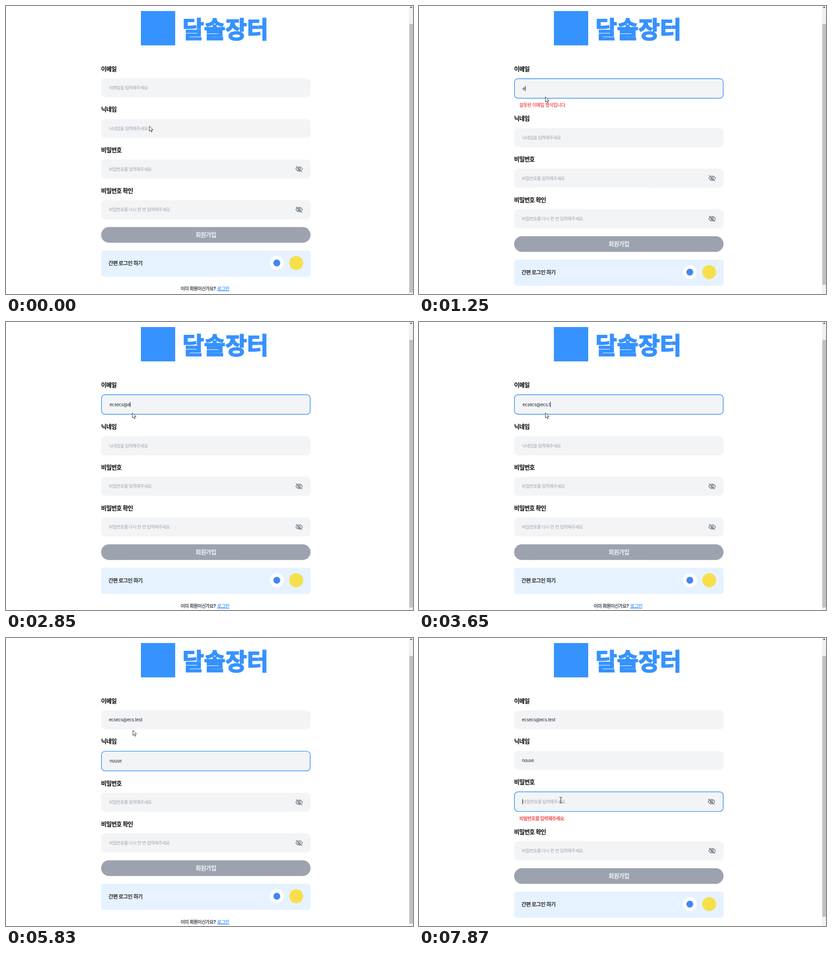
These frames come from a looping animation (890x629 px, 8000 ms). An HTML page:

```html
<!DOCTYPE html>
<html lang="ko">
<head>
<meta charset="utf-8">
<style>
  html, body { margin: 0; width: 100%; height: 100%; overflow: hidden; background: #fff; }
  svg { display: block; width: 890px; height: 629px; }
  text { font-family: Inter, 'Noto Sans CJK KR', 'Noto Sans CJK JP', sans-serif; letter-spacing: -.05em; }
  .value { letter-spacing: -.025em; }
  .wordmark { letter-spacing: 0; stroke: #3692ff; stroke-width: 2; }
  .medium { stroke: currentColor; stroke-width: .25; }
</style>
</head>
<body>
<svg id="stage" viewBox="0 0 890 629"></svg>
<script>
const LOOP = 8000, KEY_INTERVAL = 70, BLINK = 530;
const LEFT = 208, WIDTH = 458, PITCH = 88.67, BORDER = 1.43, ERROR_HEIGHT = 17.14;
const BLUE = '#3692ff', RED = '#f74747', GRAY = '#9ca3af', INK = '#1f2937';
const stage = document.getElementById('stage');

const fields = [
  { label: '이메일', hint: '이메일을 입력해주세요', error: '잘못된 이메일 형식입니다', weight: 500, focusAt: [800],
    bursts: { 1250: 'ecs', 1720: 'ecs', 2450: '@', 2850: 'ecs', 3250: '.', 3650: 'test' },
    invalid: value => value && !/^\w+@\w+(\.\w+)?$/.test(value) },
  { label: '닉네임', hint: '닉네임을 입력해주세요', focusAt: [4040], bursts: { 4510: 'nou', 5230: 'se' } },
  { label: '비밀번호', hint: '비밀번호를 입력해주세요', error: '비밀번호를 입력해주세요.', weight: 700,
    focusAt: [6320, 7870], secret: true, invalid: (value, t) => t >= 7060 },
  { label: '비밀번호 확인', hint: '비밀번호를 다시 한 번 입력해주세요', focusAt: [7060], secret: true }
];

const pointerStart = { x: 313, y: 262 };
const moves = [
  { at: 70, lasts: 320, x: 254.5, y: 180 },
  { at: 800, lasts: 330, x: 276, y: 198 },
  { at: 5800, lasts: 370, x: 333, y: 360 },
  { at: 6560, lasts: 360, x: 317, y: 446 },
  { at: 7130, lasts: 670, x: 310, y: 354 }
];

function pointerAt(t) {
  return moves.reduce((from, to) => {
    const p = Math.min(1, Math.max(0, (t - to.at) / to.lasts)), e = p * p * (3 - 2 * p);
    return { x: from.x + (to.x - from.x) * e, y: from.y + (to.y - from.y) * e };
  }, pointerStart);
}

// Text typed by time t, and when its last key was pressed
function typedAt(bursts = {}, t) {
  let value = '', keyTime = 0;
  for (const [start, word] of Object.entries(bursts)) {
    if (t < start) break;
    const count = Math.min(word.length, Math.floor((t - start) / KEY_INTERVAL) + 1);
    value += word.slice(0, count);
    keyTime = +start + (count - 1) * KEY_INTERVAL;
  }
  return { value, keyTime };
}

const lastFocus = (field, t) => Math.max(0, ...field.focusAt.filter(time => time <= t));

const rect = (x, y, w, h, r, fill, more = '') =>
  `<rect x="${x}" y="${y}" width="${w}" height="${h}" rx="${r}" fill="${fill}" ${more}/>`;
const circle = (x, y, r, fill) => `<circle cx="${x}" cy="${y}" r="${r}" fill="${fill}"/>`;
// Text whose glyphs are vertically centred on y
const text = (x, y, size, weight, fill, content, more = '') =>
  `<text x="${x}" y="${y + size * .37}" font-size="${size}" font-weight="${weight}" fill="${fill}" ${more}>${content}</text>`;
const mediumText = (x, y, size, fill, content, more = '') =>
  text(x, y, size, 500, fill, content, `class="medium" color="${fill}" ${more}`);

const eyeOff = (x, y) => `<g transform="translate(${x} ${y})" fill="none" stroke="#4b5563" stroke-width="1.15">
  <path d="M-7.2 0C-4.2-6.4 4.2-6.4 7.2 0C4.2 6.4-4.2 6.4-7.2 0Z"/><circle r="2.6"/>
  <path d="M-5.4-6.6L6.9 5.6" stroke="#f3f4f6"/><path d="M-6.5-6.2L6.2 6.3"/></g>`;

const arrow = ({ x, y }) => `<path transform="translate(${x} ${y})" d="M.4.3V11.6L3 9.2L4.9 13.4L6.7 12.6L4.9 8.5H8.4Z"
  fill="#fff" stroke="#222" stroke-width=".9"/>`;
const iBeam = ({ x, y }) => `<path transform="translate(${x} ${y})" fill="none" stroke="#222"
  d="M-3-6H-1Q0-6 0-5Q0-6 1-6H3M0-5V5M-3 6H-1Q0 6 0 5Q0 6 1 6H3"/>`;

const header = rect(295, 11, 75, 75, 0, BLUE) +
  text(386, 51.5, 51, 900, BLUE, '달솔장터', 'class="wordmark"');

function footer(shift) {
  return rect(LEFT, 482.7 + shift, WIDTH, 34.3, 17.15, GRAY) +
    text(LEFT + WIDTH / 2, 499.7 + shift, 12.86, 700, '#f3f4f6', '회원가입', 'text-anchor="middle"') +
    rect(LEFT, 534 + shift, WIDTH, 57, 5.7, '#e6f2ff') +
    mediumText(224, 562 + shift, 11.43, '#000', '간편 로그인 하기') +
    circle(592.2, 561.2 + shift, 15.2, '#fff') + circle(592.2, 561.2 + shift, 7.5, '#4285f4') +
    circle(634.6, 561.2 + shift, 15.2, '#f7df4b') +
    mediumText(382, 617 + shift, 10, INK, '이미 회원이신가요?') +
    mediumText(462, 617 + shift, 10, BLUE, '로그인', 'text-decoration="underline"');
}

const scrollbar = shift => rect(881, 0, 9, 629, 0, '#f1f1f1') +
  rect(882, 39, 8, 587 - shift * .85, 0, '#c1c1c1') +
  '<path d="M883 4L886 1L889 4Z" fill="#505050"/>';

function render(t) {
  const focusTime = Math.max(...fields.map(field => lastFocus(field, t)));
  const pointer = pointerAt(t);
  let out = header, shift = 0, caret = null, overText = false;

  fields.forEach((field, i) => {
    const active = focusTime > 0 && lastFocus(field, t) === focusTime;
    const pad = active ? BORDER : 0, textX = LEFT + 17 + pad;
    const top = 158 + i * PITCH + shift, height = 41.4 + pad * 2, middle = top + height / 2;
    const { value, keyTime } = typedAt(field.bursts, t);

    out += text(LEFT, top - 21, 12.86, 700, '#000', field.label);
    out += rect(LEFT, top, WIDTH, height, 8.57, '#f3f4f6');
    if (active) {
      out += rect(LEFT + pad / 2, top + pad / 2, WIDTH - pad, height - pad, 7.9, 'none',
        `stroke="${BLUE}" stroke-width="${BORDER}"`);
      const idle = t - Math.max(focusTime, keyTime);
      if (Math.floor(idle / BLINK) % 2 === 0) caret = { x: textX, y: middle, afterText: value !== '' };
    }
    out += value
      ? text(textX, middle, 9.52, 400, INK, value, `class="value" ${active ? 'id="typing"' : ''}`)
      : text(textX, middle, 9.52, 400, GRAY, field.hint);
    if (field.secret) out += eyeOff(641 - pad, middle);
    overText ||= Math.abs(pointer.y - middle) < 5;

    shift += pad * 2;
    if (field.invalid?.(value, t)) {
      const write = field.weight === 500 ? mediumText : (x, y, size, ...rest) => text(x, y, size, field.weight, ...rest);
      out += write(LEFT + 11.4, top + height + 14.4, 10, RED, field.error);
      shift += ERROR_HEIGHT;
    }
  });

  out += footer(shift) + scrollbar(shift) + '<path id="caret" stroke="#111"/>';
  stage.innerHTML = out + (overText ? iBeam(pointer) : arrow(pointer));

  if (caret) {
    const typedWidth = caret.afterText ? document.getElementById('typing').getComputedTextLength() : 0;
    const x = Math.round(caret.x + typedWidth) + .5;
    document.getElementById('caret').setAttribute('d', `M${x} ${caret.y - 5.7}v11.4`);
  }
}

const start = performance.now();
function tick() {
  render((performance.now() - start) % LOOP);
  requestAnimationFrame(tick);
}
tick();
</script>
</body>
</html>
```
